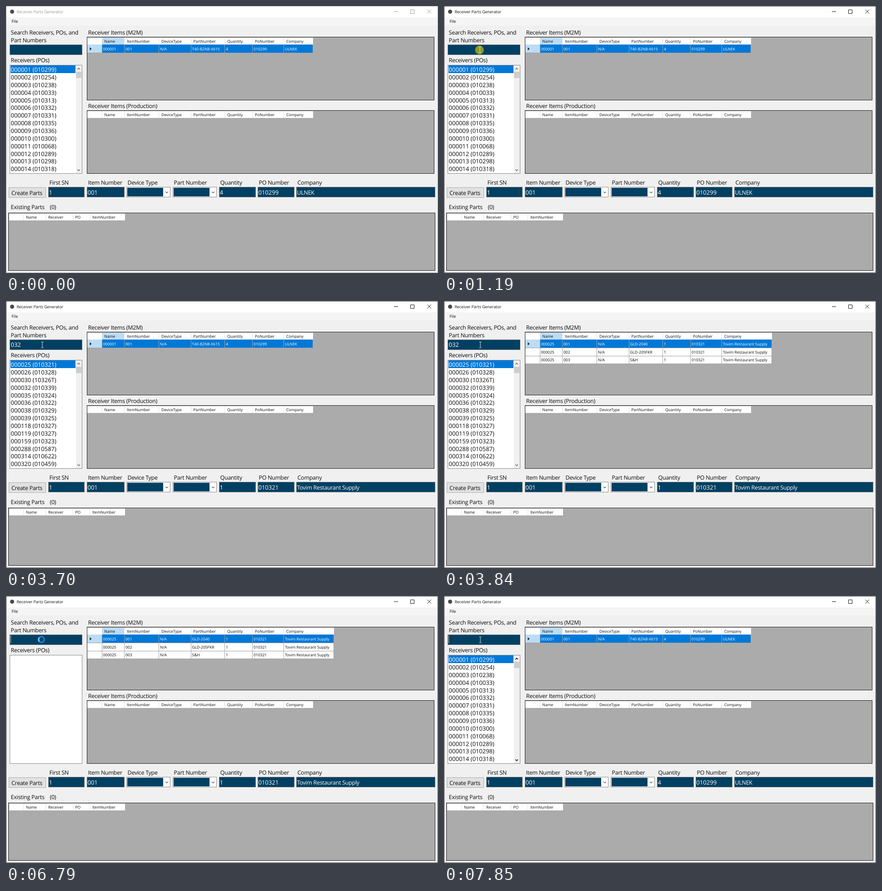
An HTML page that plays this animation: 951 by 589 pixels, repeating every 8000 ms.

```html
<!DOCTYPE html>
<html lang="en">
<head>
<meta charset="utf-8">
<title>Receiver Parts Generator</title>
<style>
  html, body { margin: 0; width: 100%; height: 100%; overflow: hidden; background: #f0f0f0; }
  svg { display: block; width: 100%; height: 100%; }
  rect, line { shape-rendering: crispEdges; }
  text { font-family: "Open Sans", "Noto Sans", sans-serif; fill: #0a0a0a; text-rendering: geometricPrecision; white-space: pre; }
  .label { font-size: 12.5px; letter-spacing: -.28px; }
  .num { font-size: 13px; }
  .cell { font-size: 8.5px; }
  .bar { font-size: 9px; letter-spacing: -.08px; }
  .white { fill: #fff; }
  .chev { fill: none; stroke: #444; stroke-width: 1.2; }
  .frame { fill: none; stroke: #a6a6a6; }
  .chrome { fill: none; stroke: #999; }
  #title { fill: #999; }
  .active .frame { stroke: #4a4a4a; }
  .active .chrome { stroke: #111; }
  .active #title { fill: #111; }
  .fresh .scroll { stroke: #3c1030; stroke-width: 1.7; }
</style>
</head>
<body>
<svg id="stage" viewBox="0 0 951 589" preserveAspectRatio="none"></svg>
<script>
const BLUE = '#0078d7', PALE = '#bcdcf4', NAVY = '#004062', GREY = '#ababab', LOOP = 8000;
const stage = document.getElementById('stage');

const esc = s => s.replace(/&/g, '&amp;');
const text = (x, y, s, cls = 'label') => `<text x="${x}" y="${y}" class="${cls}">${esc(s)}</text>`;
const rect = (x1, y1, x2, y2, fill, more = '') =>
  `<rect x="${x1}" y="${y1}" width="${x2 - x1}" height="${y2 - y1}" fill="${fill}" ${more}/>`;
const box = (x1, y1, x2, y2, fill, edge) =>
  rect(x1 + .5, y1 + .5, x2 - .5, y2 - .5, fill, `stroke="${edge}"`);
const line = (x1, y1, x2, y2, color) =>
  `<line x1="${x1}" y1="${y1}" x2="${x2}" y2="${y2}" stroke="${color}"/>`;
const chevron = (x, y, dir, cls = '') =>
  `<path class="chev ${cls}" d="M${x - 2.8} ${y - 1.4 * dir}L${x} ${y + 1.4 * dir}L${x + 2.8} ${y - 1.4 * dir}"/>`;
const group = (id, body) => `<g id="${id}">${body}</g>`;

// Text fields
const field = (x1, y1, x2, y2) => box(x1, y1, x2, y2, NAVY, '#7a7a7a');
const combo = (x1, x2) => box(x1, 399, x2, 422, '#fff', '#8a8a8a') +
  rect(x1 + 2, 401, x2 - 16, 420, NAVY) + chevron(x2 - 8, 411, 1);

function values(qty, po, company) {
  return text(94.5, 415.5, '1', 'num white') + text(179.5, 415.5, '001', 'num white') +
    text(470.5, 415.5, qty, 'num white') + text(555.5, 415.5, po, 'num white') +
    text(640.5, 415.5, company, 'label white');
}

// Data grids
const heads = ['Name', 'ItemNumber', 'DeviceType', 'PartNumber', 'Quantity', 'PoNumber', 'Company'];
const edges = [211, 260.5, 336.5, 407, 481.5, 542.5, 611.5];

function header(x, y, right, cols, names, marked) {
  let s = rect(x, y, right, y + 15, '#fff');
  if (marked) s += rect(cols[0], y, cols[1], y + 15, PALE);
  names.forEach((n, i) => {
    s += line(cols[i], y, cols[i], y + 15, '#e2e2e2') + text(cols[i] + 5.5, y + 11, n, 'cell');
  });
  return s;
}

function items(right, rows) {
  let s = header(179, 70, right, edges, heads, true), top = 85;
  rows.forEach((row, r) => {
    const end = Math.round(86 + (r + 1) * 17.4), on = r === 0;
    s += rect(179, top, right, end, on ? BLUE : '#fff') + rect(179, top, 210.5, end, on ? PALE : '#fff');
    s += line(179, end + .5, right, end + .5, '#a0a0a0');
    row.forEach((v, i) => {
      s += line(edges[i], top, edges[i], end, '#a0a0a0') +
        text(edges[i] + 2.5, end - 5.4, v, on ? 'cell white' : 'cell');
    });
    s += line(right - .5, top, right - .5, end, '#a0a0a0');
    top = end + 1;
  });
  return s + '<path d="M184.5 91L188.5 94.5L184.5 98Z" fill="#222"/>';
}

// Receiver list
const listing = rows => rect(10, 131, 153, 148, BLUE) +
  rows.map((s, i) => text(10.6, 145.2 + i * 16.85, s, i ? 'num' : 'num white')).join('') +
  rect(153.5, 131, 167, 369, '#f0f0f0') + rect(154, 145, 166, 159, '#cdcdcd') +
  chevron(160, 138.5, -1, 'scroll') + chevron(160, 362, 1, 'scroll');

const allRows = '299 254 238 033 313 332 331 335 336 300 068 289 298 318'.split(' ')
  .map((po, i) => `${String(i + 1).padStart(6, '0')} (010${po})`);
const foundRows = ('025 010321,026 010328,030 10326T,032 010339,035 010324,036 010322,038 010329,' +
  '039 010325,118 010327,119 010327,159 010323,288 010587,314 010622,320 010459').split(',')
  .map(s => '000' + s.replace(' ', ' (') + ')');

const firm = 'ULNEK', shop = 'Tovim Restaurant Supply';
const found = (n, part) => ['000025', n, 'N/A', part, '1', '010321', shop];

const labels = [
  [10.6, 62.5, 'Search Receivers, POs, and'], [10.6, 79.5, 'Part Numbers'], [10.6, 124.2, 'Receivers (POs)'],
  [180.8, 62.5, 'Receiver Items (M2M)'], [180.8, 224.5, 'Receiver Items (Production)'],
  [95.6, 393.7, 'First SN'], [180.5, 393.7, 'Item Number'], [267.6, 393.7, 'Device Type'],
  [369.6, 393.7, 'Part Number'], [471.6, 393.7, 'Quantity'], [556.5, 393.7, 'PO Number'],
  [641.5, 393.7, 'Company'], [10.6, 448.2, 'Existing Parts'], [96.5, 448.2, '(0)']
];

stage.innerHTML =
  rect(0, 0, 951, 589, '#f0f0f0') + rect(0, 0, 951, 25, '#fff') + rect(0, 25, 951, 43, '#f5f5f5') +
  '<circle cx="13.5" cy="12.5" r="4.5" fill="#4a4a4a"/>' +
  `<text id="title" class="bar" x="23.4" y="16">Receiver Parts Generator</text>` +
  '<path class="chrome" d="M854 12.5H863M890.5 8.5H898.5V16.5H890.5ZM927.5 8L936 16.5M936 8L927.5 16.5"/>' +
  text(12.3, 37.3, 'File', 'bar') +
  labels.map(a => text(...a)).join('') +
  field(8, 85, 168, 108) +
  box(8, 130, 168, 370, '#fff', '#828790') +
  box(178, 68, 943, 208, GREY, '#1c1c1c') +
  box(178, 230, 943, 370, GREY, '#1c1c1c') + header(179, 232, 676, edges, heads) +
  box(5, 456, 945, 584, GREY, '#1c1c1c') +
  header(7, 458, 261.5, [38.5, 87.5, 147, 184.5], ['Name', 'Receiver', 'PO', 'ItemNumber']) +
  box(6, 400, 88, 423, '#e1e1e1', '#adadad') + text(12, 416.5, 'Create Parts') +
  [[93, 173], [178, 261], [469, 550], [554, 635], [639, 945]].map(([a, b]) => field(a, 399, b, 422)).join('') +
  combo(265, 362) + combo(367, 464) +
  group('listAll', listing(allRows)) + group('listFound', listing(foundRows)) +
  group('valuesAll', values('4', '010299', firm)) + group('valuesFound', values('1', '010321', shop)) +
  group('gridAll', items(676, [['000001', '001', 'N/A', 'T40-B2N8-X615', '4', '010299', firm]])) +
  group('gridFound', items(721.5, [found('001', 'GLD-2040'), found('002', 'GLD-205FKR'), found('003', 'S&H')])) +
  group('selection', rect(10, 87, 33, 104, BLUE)) +
  '<text id="query" class="num white" x="10.5" y="101"></text>' +
  group('caret', rect(0, 87, 1, 104, '#ffc09c')) +
  group('click', '<circle cx="78" cy="97" r="9.7" fill="#8c9a22"/>') +
  group('beam', '<path d="M-2.5 -6.5H-.7L0 -5.8L.7 -6.5H2.5M0 -6V6M-2.5 6.5H-.7L0 5.8L.7 6.5H2.5" fill="none" stroke="#dfe6ea"/>') +
  group('arrow', '<path d="M0 0V13.5L3.1 10.6L5.2 15.4L7.3 14.5L5.2 9.8H9.5Z" fill="#fff" stroke="#000" stroke-width=".8"/>') +
  group('wait', '<circle r="6.3" fill="none" stroke="#1583d6" stroke-width="3.2"/>' +
    '<path id="spin" d="M0 -6.3A6.3 6.3 0 0 1 6.3 0" fill="none" stroke="#6cc4f7" stroke-width="3.2"/>') +
  '<rect class="frame" x=".5" y=".5" width="950" height="588"/>';

// Each track is a series of [start time, value].
const tracks = {
  query: [[0, ''], [2610, '0'], [2740, '03'], [2940, '032'], [5760, '']],
  caret: [[0, 0], [1460, 1], [2080, 0], [2610, 1], [3490, 0], [4040, 1], [4570, 0], [5100, 1],
    [6260, 0], [6790, 1], [7320, 0], [7850, 1]],
  pointer: [[0, ''], [350, 'move'], [1120, 'beam'], [2610, ''], [3420, 'wait'], [3630, 'beam'],
    [6240, 'wait'], [6920, 'beam']],
  list: [[0, 'All'], [3630, 'Found'], [6240, ''], [6860, 'All']],
  values: [[0, 'All'], [3700, 'Found'], [6920, 'All']],
  grid: [[0, 'All'], [3770, 'Found'], [6990, 'All']]
};
const at = (name, t) => tracks[name].filter(k => k[0] <= t).pop()[1];
const el = id => document.getElementById(id);
const show = (id, on) => { el(id).style.display = on ? '' : 'none'; };
const place = (id, x, y) => el(id).setAttribute('transform', `translate(${x} ${y})`);
const ease = p => p * p * (3 - 2 * p);

function drawPointer(t) {
  let kind = at('pointer', t), x = 80, y = 96.8;
  if (kind === 'move') {
    const p = ease(Math.floor((t - 350) / 70) / 11);
    x = 858 + (79 - 858) * p;
    y = 543 + (97 - 543) * p;
    kind = x < 168 && y < 108 ? 'beam' : 'arrow';
  } else if (t < 1460) x = 79;
  if (kind === 'wait') { x = 78; y = 96; }
  for (const id of ['beam', 'arrow', 'wait']) show(id, id === kind);
  if (kind) place(kind, x, y);
  el('spin').setAttribute('transform', `rotate(${Math.floor(t / 70) * 32})`);
}

function draw(t) {
  stage.classList.toggle('active', t >= 1190);
  stage.classList.toggle('fresh', t >= 6860);
  for (const part of ['list', 'values', 'grid'])
    for (const set of ['All', 'Found']) show(part + set, at(part, t) === set);
  const query = at('query', t), selected = t >= 5230 && t < 5760;
  el('query').textContent = query;
  show('selection', selected);
  show('caret', at('caret', t));
  place('caret', selected || !query ? 10 : Math.floor(10.5 + 7.44 * query.length), 0);
  show('click', t >= 1190 && t < 1400);
  drawPointer(t);
}

const start = performance.now();
function tick() {
  draw((performance.now() - start) % LOOP);
  requestAnimationFrame(tick);
}
tick();
</script>
</body>
</html>
```
